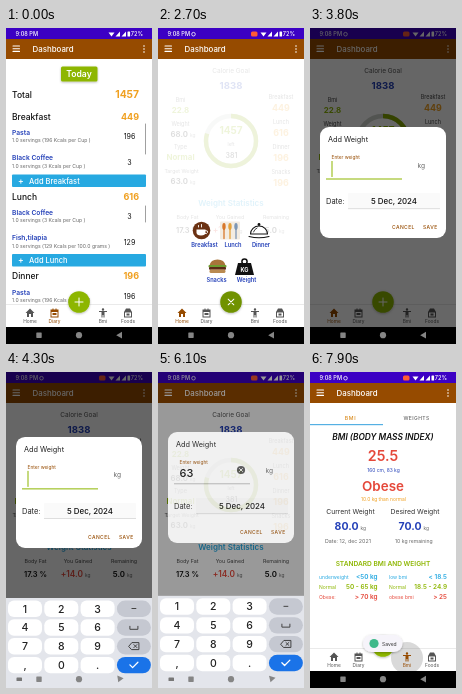
An HTML page that plays this animation: 146 px wide and 316 px high, repeating every 8 s.

```html
<!DOCTYPE html>
<html lang="en">
<head>
<meta charset="utf-8">
<title>Calorie diary</title>
<style>
html, body { margin: 0; width: 100%; height: 100%; overflow: hidden; background: #fff; }
svg { display: block; width: 100vw; height: 100vh; font-family: Inter, Roboto, sans-serif; }
</style>
</head>
<body>
<svg id="stage" viewBox="0 0 146 316"></svg>
<script>
const LOOP = 8000, STEP = 100;
const GREEN = '#8db600', ORANGE = '#f0a020', BLUE = '#2440b8', CYAN = '#27a9e1',
  RED = '#e5483a', BROWN = '#964b00', INK = '#111', GREY = '#666';
const stage = document.getElementById('stage');

function el(parent, tag, attrs = {}) {
  const n = document.createElementNS('http://www.w3.org/2000/svg', tag);
  set(n, attrs);
  parent.appendChild(n);
  return n;
}
function set(n, attrs) {
  for (const k in attrs) n.setAttribute(k, attrs[k]);
}
const group = (parent = stage) => el(parent, 'g');
const rect = (g, x, y, width, height, fill, rx = 0) => el(g, 'rect', { x, y, width, height, fill, rx });
const disc = (g, cx, cy, r, fill) => el(g, 'circle', { cx, cy, r, fill });
const fillPath = (g, d, fill) => el(g, 'path', { d, fill });
const line = (g, d, stroke, w = 1) => el(g, 'path',
  { d, stroke, 'stroke-width': w, fill: 'none', 'stroke-linecap': 'round', 'stroke-linejoin': 'round' });
function text(g, x, y, size, str, fill = INK, weight = 400, anchor = 'start', extra = {}) {
  const n = el(g, 'text', { x, y, 'font-size': size, fill, 'font-weight': weight, 'text-anchor': anchor, ...extra });
  n.textContent = str;
  return n;
}
const mid = (g, x, y, size, str, fill, weight) => text(g, x, y, size, str, fill, weight, 'middle');
const end = (g, x, y, size, str, fill, weight) => text(g, x, y, size, str, fill, weight, 'end');

// soft drop shadow
const defs = el(stage, 'defs');
const blur = el(defs, 'filter', { id: 'shadow', x: '-30%', y: '-30%', width: '160%', height: '180%' });
el(blur, 'feDropShadow', { dx: 0, dy: .8, stdDeviation: 1, 'flood-color': '#000', 'flood-opacity': .3 });
const lift = n => { set(n, { filter: 'url(#shadow)' }); return n; };

rect(stage, 0, 0, 146, 316, '#fff');

// diary page
const diary = group();
rect(diary, 0, 31, 146, 250, '#fff');
lift(rect(diary, 55, 38.5, 36.5, 15, GREEN, 1.5));
mid(diary, 73, 49.2, 8.6, 'Today', '#fff', 600);
function meal(y, name, total, size = 9) {
  text(diary, 6, y, 8.5, name, INK, 500);
  end(diary, 133, y + .3, size, total, ORANGE, 700);
}
function food(y, name, info, kcal) {
  text(diary, 6, y, 6.7, name, BLUE, 600);
  text(diary, 6, y + 7.6, 5.1, '1.0 servings (' + info + ' )', GREY);
  mid(diary, 123.5, y + 4.5, 7.1, kcal);
}
function addBar(y, name) {
  rect(diary, 6, y, 134, 12.6, CYAN, 1);
  text(diary, 12, y + 9.2, 8.5, '+', '#fff', 600);
  text(diary, 23, y + 9, 7.5, 'Add ' + name, '#fff', 500);
}
meal(70, 'Total', '1457', 10.3);
meal(92, 'Breakfast', '449');
food(106.5, 'Pasta', '196 Kcals per Cup', '196');
food(132, 'Black Coffee', '3 Kcals per Cup', '3');
addBar(146.5, 'Breakfast');
meal(171.5, 'Lunch', '616');
food(186.5, 'Black Coffee', '3 Kcals per Cup', '3');
food(212, 'Fish,tilapia', '129 Kcals per 100.0 grams', '129');
addBar(226, 'Lunch');
meal(251, 'Dinner', '196');
food(266.5, 'Pasta', '196 Kcals per Cup', '196');
line(diary, 'M139.500 96V126M139.500 178V194', '#888', .8);

// dashboard page
const dash = group();
rect(dash, 0, 31, 146, 250, '#fff');
mid(dash, 73, 44.5, 6.5, 'Calorie Goal', '#555');
mid(dash, 73, 61, 9.6, '1838', BLUE, 700);
function stat(x, y, label, value, fill, size, drop) {
  mid(dash, x, y, 5.5, label, '#444');
  mid(dash, x, y + drop, size, value, fill, 700);
}
function kilos(g, x, y, value, size = 7.9, fill = INK, weight = 600) {
  end(g, x, y, size, value, fill, weight);
  text(g, x + 2, y, 4.8, 'kg', GREY);
}
stat(22.5, 74, 'Bmi', '22.8', GREEN, 7.9, 11);
mid(dash, 22.5, 98, 5.5, 'Weight', '#444');
kilos(dash, 30, 108.5, '68.0');
stat(22.5, 121, 'Type', 'Normal', GREEN, 7.9, 11);
mid(dash, 23.5, 145, 5.2, 'Target Weight', '#444');
kilos(dash, 30, 155.5, '63.0');
[['Breakfast', '449'], ['Lunch', '616'], ['Dinner', '196'], ['Snacks', '196']]
  .forEach(([name, v], i) => stat(123, 71 + i * 25, name, v, ORANGE, 8.9, 12));
const R = 25, ARC = 2 * Math.PI * R;
el(dash, 'circle', { cx: 73, cy: 113, r: R, fill: 'none', stroke: '#cfd2cb', 'stroke-width': 4.4 });
const ring = el(dash, 'circle', { cx: 73, cy: 113, r: R, fill: 'none', stroke: '#86a800', 'stroke-width': 4.4,
  transform: 'rotate(-90 73 113)' });
mid(dash, 73, 105.5, 10, '1457', GREEN, 700);
mid(dash, 73, 118, 4.6, 'left', '#444');
mid(dash, 73.5, 130, 7.1, '381', INK, 500);
mid(dash, 73, 178, 8, 'Weight Statistics', CYAN, 600);
['Body Fat', 'You Gained', 'Remaining'].forEach((s, i) => mid(dash, [29.5, 72, 118][i], 190.5, 5.3, s, '#444'));
text(dash, 18, 204.5, 7.5, '17.3 %', INK, 600);
kilos(dash, 77, 205, '+14.0', 8.3, RED);
kilos(dash, 119, 204.5, '5.0');

// body mass page
const bmi = group();
rect(bmi, 0, 31, 146, 250, '#fff');
text(bmi, 40.5, 47.5, 5.2, 'BMI', '#d98a1c', 500, 'middle', { 'letter-spacing': .6 });
text(bmi, 106.5, 47.5, 5, 'WEIGHTS', GREY, 500, 'middle', { 'letter-spacing': .4 });
rect(bmi, 0, 52, 73, 1.2, '#55b0e3');
text(bmi, 73, 67.5, 8.3, 'BMI (BODY MASS INDEX)', INK, 600, 'middle', { 'font-style': 'italic' });
mid(bmi, 73, 88.5, 14.2, '25.5', RED, 600);
mid(bmi, 73.5, 100, 4.9, '160 cm, 83 kg', BLUE);
mid(bmi, 73, 118.5, 13.4, 'Obese', RED, 600);
mid(bmi, 73.5, 128.5, 4.9, '10.0 kg than normal', ORANGE);
mid(bmi, 40.5, 142, 6.8, 'Current Weight', '#333');
mid(bmi, 105, 142, 6.8, 'Desired Weight', '#333');
kilos(bmi, 48.5, 157.5, '80.0', 10.5, BLUE, 700);
kilos(bmi, 111.5, 157.5, '70.0', 10.5, BLUE, 700);
text(bmi, 15, 170.5, 5.3, 'Date: 12, dec 2021', GREY);
text(bmi, 85, 170.5, 5.1, '10 kg remaining', GREY);
mid(bmi, 73, 194, 6.6, 'STANDARD BMI AND WEIGHT', GREEN, 600);
[['underweight', '<50 kg', 'low bmi', '< 18.5', CYAN],
 ['Normal', '50 - 65 kg', 'Normal', '18.5 - 24.9', GREEN],
 ['Obese:', '> 70 kg', 'obese bmi', '> 25', RED]].forEach(([a, b, c, d, fill], i) => {
  const y = 207.4 + i * 10;
  text(bmi, 9, y, 5, a, fill);
  end(bmi, 67.5, y, 6.4, b, fill, 600);
  text(bmi, 79, y, 5, c, fill);
  end(bmi, 137, y, 6.4, d, fill, 600);
});

// quick-add menu
const veil = rect(stage, 0, 31, 146, 246, '#fff');
const menu = group();
const items = [];
function item(x, y, name, labelX, labelY, draw) {
  const g = group(menu), icon = group(g);
  set(icon, { transform: `translate(${x} ${y})` });
  draw(icon);
  mid(g, labelX, labelY, 5.7, name, BLUE, 600);
  items.push([g, x, labelY - 2]);
}
item(43.5, 202.5, 'Breakfast', 46.5, 219, g => {
  disc(g, 0, 0, 8.8, '#6b3213');
  fillPath(g, 'M-5 -1H4V2Q4 5-.500 5Q-5 5-5 2Z', '#fff');
  line(g, 'M4 0Q7 0 6 2T3.500 3M-3 -3.500V-5M0 -3.500V-6', '#fff', .9);
});
item(72, 202.5, 'Lunch', 75, 219, g => {
  rect(g, -10, -9, 20, 18, '#f3ece1', 1);
  [[-6, '#d8782a'], [0, '#e4a23c'], [6, '#7d97b5']].forEach(([x, c]) => {
    line(g, `M${x} -1V8`, c, 1.3);
    el(g, 'ellipse', { cx: x, cy: -4, rx: 1.7, ry: 3.4, fill: c });
  });
});
item(101, 203, 'Dinner', 103, 219, g => {
  line(g, 'M-8.500 3A8.500 8 0 0 1 8.500 3Z', INK, 1.1);
  line(g, 'M-10 5.500Q0 8 10 5.500', INK, 1.1);
  disc(g, 0, -6.5, 1.4, INK);
  line(g, 'M-5.500 1Q-4.500 -2-2 -3', INK, .8);
});
item(59.5, 238.5, 'Snacks', 58.5, 253.5, g => {
  fillPath(g, 'M-8 -1Q-7 -7 0 -7T8 -1Z', '#a8743a');
  rect(g, -9, -1.5, 18, 2.4, '#6d9c2f', 1);
  rect(g, -8.5, .6, 17, 2.6, '#5a2a16', 1);
  rect(g, -8, 3, 16, 3.6, '#b98a50', 1.6);
});
item(86.5, 239, 'Weight', 88.5, 253.5, g => {
  el(g, 'circle', { cx: 0, cy: -5.5, r: 2.6, fill: 'none', stroke: INK, 'stroke-width': 1.5 });
  fillPath(g, 'M-6.500 -4H6.500L9.500 8H-9.500Z', INK);
  mid(g, 0, 4.6, 5.6, 'KG', '#fff', 700);
});

// bottom tabs
const tabs = group();
rect(tabs, 0, 276.5, 146, 23, '#fff');
rect(tabs, 0, 276, 146, .6, '#ddd');
const ripple = disc(tabs, 97, 286, 16, '#777');
const tabGroups = [
  [24, 'Home', 'M-4.500 0L0 -4.500L4.500 0H3V4H1V1H-1V4H-3V0Z'],
  [48.5, 'Diary', 'M-4 -3.500H-2V-4.500H-1V-3.500H1V-4.500H2V-3.500H4V4.500H-4ZM-3 -1V3.500H3V-1ZM-2 0H2V2H-2Z'],
  [97, 'Bmi', 'M-1.200 -3.500A1.200 1.200 0 1 1 1.200 -3.500A1.200 1.200 0 1 1-1.200 -3.500ZM-4 -2H4V-1H1.500V4.500H.5V2H-.5V4.500H-1.500V-1H-4Z'],
  [122, 'Foods', 'M-4 -1L-2 -4.500H2L4 -1V4.500H-4ZM-3 -.5V3.500H3V-.5ZM-1.500 .5H1.500V2.500H-1.500Z']
].map(([x, name, d]) => {
  const g = group(tabs);
  el(g, 'path', { d, transform: `translate(${x} 285)`, 'fill-rule': 'evenodd' });
  mid(g, x, 295, 4.8, name).removeAttribute('fill');
  return g;
});
const fab = lift(disc(stage, 73, 274, 10.8, GREEN));
const cross = line(stage, 'M69 274H77M73 270V278', '#fff', 1);

// header and system bars
rect(stage, 0, 0, 146, 11, '#3c00c4');
rect(stage, 0, 11, 146, 20, BROWN);
text(stage, 9.5, 8.3, 5.6, '9:08 PM', '#fff', 500);
const casting = group();
rect(casting, 93, 3.5, 6.5, 5, '#ff5a36', 1.5);
el(casting, 'circle', { cx: 35.5, cy: 6.2, r: 1.8, fill: 'none', stroke: '#fff', 'stroke-width': .8 });
fillPath(stage, 'M102.500 4.500H108.500L105.500 8.500ZM114 3.500V8.500H109.500ZM120 3.500V8.500H115.500Z', '#fff');
rect(stage, 121.5, 3.4, 2.6, 5.2, '#fff', .6);
end(stage, 137, 8.3, 5.6, '72%', '#fff', 500);
line(stage, 'M7 18H13.500M7 20.700H13.500M7 23.400H13.500', '#fff', 1.1);
text(stage, 26.5, 23.8, 7.9, 'Dashboard', '#fff', 500);
[18, 21, 24].forEach(y => disc(stage, 138, y, .8, '#fff'));
rect(stage, 0, 299, 146, 17, '#000');

const dim = rect(stage, 0, 0, 146, 316, '#000');

// add-weight dialog
const dialog = group();
rect(dialog, 10, 60, 126, 111, '#fff', 9);
text(dialog, 18, 75, 7.3, 'Add Weight', '#222');
const hint = text(dialog, 21.5, 103, 10.4, 'Enter wei...', '#777');
const label = text(dialog, 21.5, 92, 4.8, 'Enter weight', BROWN);
const entry = text(dialog, 21.5, 105, 11, '', INK, 500);
const caret = rect(dialog, 21.5, 94, 1, 16, GREEN);
const rule = rect(dialog, 16, 111.5, 76, 1, GREEN);
const clear = group(dialog);
disc(clear, 83, 98, 4.1, '#555');
line(clear, 'M81.500 96.500L84.500 99.500M84.500 96.500L81.500 99.500', '#fff', .9);
text(dialog, 107.5, 100.5, 6.6, 'kg', GREY);
text(dialog, 16, 137, 7.5, 'Date:', '#222');
rect(dialog, 38, 126, 92, 16, '#fafafa', 1);
rect(dialog, 38, 141.5, 92, .6, '#ccc');
mid(dialog, 84, 137, 7.9, '5 Dec, 2024', INK, 500);
text(dialog, 82, 162, 5, 'CANCEL', BROWN, 500, 'start', { 'letter-spacing': .4 });
text(dialog, 113, 162, 5, 'SAVE', BROWN, 500, 'start', { 'letter-spacing': .4 });

// number pad
const pad = group(), keys = {};
rect(pad, 0, 220, 146, 110, '#e3e5eb');
['123-', '456 ', '789<', ',0.!'].forEach((row, r) => [...row].forEach((c, i) => {
  const x = 2 + i * 36.3, y = 222.5 + r * 18.8, cx = x + 17, cy = y + 8;
  keys[c] = rect(pad, x, y, 34, 16.4, c === '!' ? '#1a73e8' : i === 3 ? '#c5c8d1' : '#fff', i === 3 ? 8.2 : 6);
  if (i < 3) mid(pad, cx, cy + 4, 10.5, c, '#222', 500);
  else if (c === '-') line(pad, `M${cx - 2} ${cy}h4`, '#444');
  else if (c === ' ') line(pad, `M${cx - 4} ${cy - 1}v3h8v-3`, '#444');
  else if (c === '<') line(pad, `M${cx - 5} ${cy}l3 -3.500h7v7h-7ZM${cx} ${cy - 1.5}l3 3m0 -3l-3 3`, '#333', .9);
  else line(pad, `M${cx - 4} ${cy}l2.700 2.700l5.300 -5.300`, '#fff', 1.3);
}));

// navigation buttons
const sys = group();
set(sys, { color: '#858585' });
rect(sys, 30.3, 304.5, 5.4, 5.4, 'currentColor', .6);
disc(sys, 73, 307.2, 3.1, 'currentColor');
const back = fillPath(sys, 'M-3.300 0L2.500 -3.400V3.400Z', 'currentColor');
const padIcon = rect(stage, 10.5, 305.5, 5.5, 3.5, '#777', .6);

const toast = group();
lift(rect(toast, 53, 263, 39.5, 17, '#f6f4fa', 8.5));
disc(toast, 64, 271.5, 4.6, '#3fb98a');
text(toast, 72, 273.7, 5, 'Saved', '#333');

const prog = (t, a, b) => Math.min(1, Math.max(0, (t - a) / (b - a)));
const out = (u, p) => 1 - Math.pow(1 - u, p);
const fade = (n, o) => set(n, { opacity: o, visibility: o > 0 ? 'visible' : 'hidden' });

function draw(t) {
  const toDash = prog(t, 0, 300), toBmi = prog(t, 7500, 7800);
  fade(diary, toDash < 1 ? 1 : 0);
  fade(dash, toDash);
  fade(bmi, toBmi);
  fade(casting, t >= 100 ? 1 : 0);
  const share = 1457 / 1838 * out(prog(t, 0, 600), 2);
  set(ring, { 'stroke-dasharray': `${ARC * share} ${ARC}` });

  const open = out(prog(t, 1400, 2300), 3) * (1 - prog(t, 2800, 3340));
  fade(veil, open * .86);
  fade(menu, open > 0 ? 1 : 0);
  items.forEach(([g, x, y]) => set(g, { transform: `translate(${x} ${y}) scale(${open}) translate(${-x} ${-y})` }));
  set(cross, { transform: `rotate(${45 * open} 73 274)` });
  set(fab, { fill: open > .5 ? '#6f9200' : GREEN });

  const active = t < 100 ? 1 : t < 7600 ? 0 : 2;
  tabGroups.forEach((g, i) => set(g, { fill: i === active ? BROWN : '#555' }));
  const press = prog(t, 7500, 7900);
  set(ripple, { r: 16 * press });
  fade(ripple, press * .28);

  const shown = prog(t, 3180, 3480) * (1 - prog(t, 6000, 6300));
  fade(dim, shown * .6);
  fade(dialog, Math.min(1, shown * 1.3));
  const u = prog(t, 4000, 4600), v = prog(t, 6000, 6500);
  set(dialog, { transform: `translate(0 ${39 * (1 - out(u, 3))})` });

  const focus = t >= 3800, typed = t < 4900 ? '' : t < 5200 ? '6' : '63';
  const see = (n, on) => fade(n, on && shown > 0 ? 1 : 0);
  see(hint, !focus);
  see(label, focus);
  see(clear, typed !== '');
  see(caret, focus && t < 5600);
  entry.textContent = typed;
  set(caret, { x: 21.5 + typed.length * 6.8 });
  set(rule, { fill: focus && !typed ? GREEN : '#999', height: focus && !typed ? 1 : .7 });

  const rise = out(u, 4) * (1 - v * v);
  set(pad, { transform: `translate(0 ${96 * (1 - rise)})` });
  fade(pad, rise > 0 ? 1 : 0);
  set(keys[6], { fill: t >= 4800 && t < 5000 ? '#d3d6df' : '#fff' });
  set(keys[3], { fill: t >= 5100 && t < 5300 ? '#d3d6df' : '#fff' });
  set(back, { transform: `translate(113.500 307.200) rotate(${-90 * out(u, 2) * (1 - v)})` });
  fade(padIcon, rise > .2 ? 1 : 0);

  fade(toast, t >= 7000 ? 1 : 0);
}

const start = performance.now();
function tick() {
  const t = (performance.now() - start) % LOOP;
  draw(Math.floor(t / STEP) * STEP);
  requestAnimationFrame(tick);
}
draw(0);
requestAnimationFrame(tick);
</script>
</body>
</html>
```
